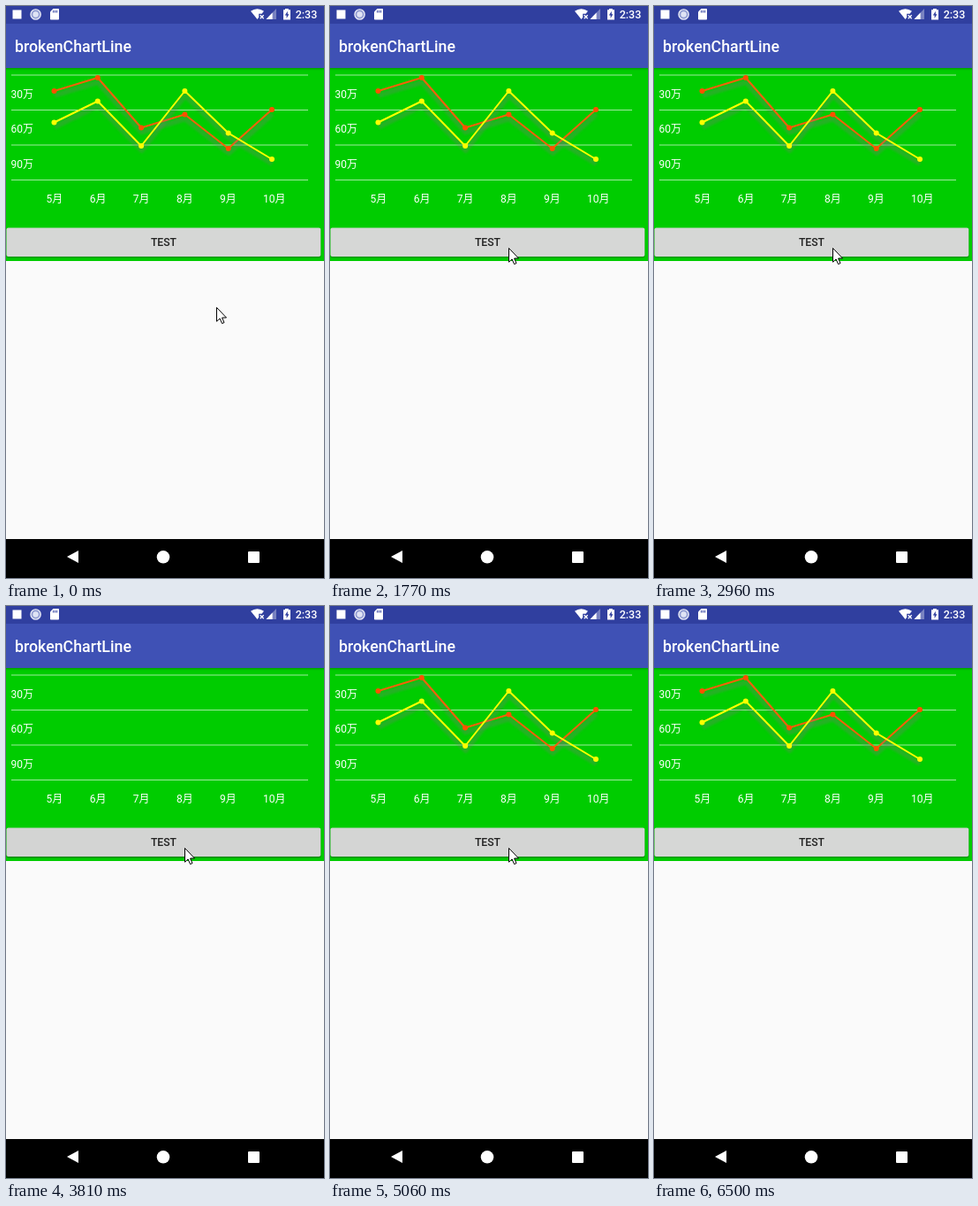
Recreate the animation shown at these times as an HTML page. Size 360x646 px, loop 6930 ms.

```html
<!DOCTYPE html>
<html lang="en">
<head>
<meta charset="utf-8">
<title>brokenChartLine</title>
<style>
  html, body { margin: 0; width: 100%; height: 100%; overflow: hidden; background: #fafafa; }
  svg { display: block; width: 360px; height: 646px; }
  text { font-family: Roboto, "Noto Sans CJK SC", "Noto Sans CJK", sans-serif; fill: #fff; }
  .medium { font-weight: 500; }
  .label { font-size: 12px; }
</style>
</head>
<body>
<svg viewBox="0 0 360 646" xmlns="http://www.w3.org/2000/svg">
  <defs>
    <filter id="soft" x="-10%" y="-20%" width="120%" height="140%"><feGaussianBlur stdDeviation="0.8"/></filter>
    <linearGradient id="fall" x2="0" y2="1">
      <stop stop-opacity=".22"/><stop offset="1" stop-opacity="0"/>
    </linearGradient>
  </defs>

  <rect width="360" height="646" fill="#fafafa"/>
  <rect width="360" height="20" fill="#303f9f"/>
  <rect y="20" width="360" height="50" fill="#3f51b5"/>
  <rect y="70" width="360" height="218" fill="#00cc00"/>
  <rect y="70" width="360" height="3" fill="url(#fall)"/>
  <rect y="602" width="360" height="44"/>

  <!-- status bar -->
  <g fill="#fff">
    <rect x="7.5" y="4.5" width="10" height="10"/>
    <circle cx="33.6" cy="9.5" r="5.6" fill="#8f9ad0" stroke="#e8eaf6" stroke-width="1.4"/>
    <circle cx="33.6" cy="9.5" r="3.2" fill="#dfe3f4"/>
    <path d="M53.5 3H59.2Q60 3 60 3.8V14.7Q60 15.5 59.2 15.5H50.8Q50 15.5 50 14.7V6.5Z"/>
    <path d="M53.6 5V7.6M55.6 5V7.6M57.6 5V7.6" stroke="#303f9f"/>
    <path d="M277 5.8Q284.5 .6 292 5.8L289.6 8.8H286.2V12.8L284.5 15Z"/>
    <path d="M287.7 10.3L291.7 14.3M291.7 10.3L287.7 14.3" stroke="#fff" stroke-width="1.3"/>
    <path d="M306 3V15H294.5Z" opacity=".35"/>
    <path d="M301.6 7.6V15H294.5Z"/>
    <path d="M316 4.2V3H319.8V4.2H322V15.6H314V4.2Z"/>
    <path d="M318.8 5.8L315.8 10.5H317.6V14L320.4 9.2H318.8Z" fill="#303f9f"/>
  </g>
  <text class="medium" x="327.7" y="14" font-size="12.5">2:33</text>
  <text class="medium" x="10" y="51.6" font-size="17.8">brokenChartLine</text>

  <g id="grid"></g>
  <g id="series"></g>

  <!-- button -->
  <rect id="shade" x=".5" y="251" width="356" height="33.5" rx="2.5" fill="#063c06"/>
  <rect id="face" x=".5" y="250.6" width="355.8" height="32.4" rx="2"/>
  <text class="medium" x="178.5" y="271.3" font-size="12.2" text-anchor="middle" style="fill:#222">TEST</text>

  <!-- navigation bar -->
  <g fill="#fff">
    <path d="M69 622L82 615V629Z"/>
    <circle cx="178" cy="622.3" r="7.3"/>
    <rect x="274" y="616" width="13" height="13" rx="1"/>
  </g>

  <path id="cursor" d="M.5 .5V16.2L4.1 12.9L6.6 18.6L9 17.5L6.6 12H11.5Z" fill="#fff" stroke="#000"/>
</svg>

<script>
const LOOP = 6930;
const TICK = 136.8;             // the screen refreshes in coarse steps
const LEAD = 20;
const POINTS = 6;
const TAPS = [15, 28, 37.3];    // in ticks
const ARRIVE = 13, LEAVE = 41;  // pointer reaches and leaves the button
const $ = id => document.getElementById(id);
const clamp = v => Math.min(1, Math.max(0, v));

function add(parent, tag, attrs, text) {
  const node = document.createElementNS("http://www.w3.org/2000/svg", tag);
  for (const key in attrs) node.setAttribute(key, attrs[key]);
  if (text) node.textContent = text;
  parent.appendChild(node);
  return node;
}

// Grid and axis labels
for (let i = 0; i < 4; i++)
  add($("grid"), "path", { d: `M6 ${78 + 39.5 * i}H342`, stroke: "#fff", "stroke-opacity": 0.62 });
for (let i = 0; i < 3; i++)
  add($("grid"), "text", { class: "label", x: 5.6, y: 103.6 + 39.5 * i }, `${30 * (i + 1)}万`);
for (let i = 0; i < POINTS; i++)
  add($("grid"), "text", { class: "label", x: 45.6 + 49.1 * i, y: 222 }, `${i + 5}月`);

function makeSeries(heights, line, dot) {
  const points = heights.map((y, i) => [54.5 + 49.3 * i, y]);
  const group = add($("series"), "g", { fill: "none", "stroke-linejoin": "round" });
  const shadow = add(group, "path", {
    stroke: "#777", "stroke-opacity": 0.3, "stroke-width": 6,
    transform: "translate(.5 5)", filter: "url(#soft)"
  });
  const path = add(group, "path", { stroke: line, "stroke-width": 2 });
  const dots = points.map(([cx, cy]) => add(group, "circle", { cx, cy, r: 3, fill: dot }));
  return count => {
    const d = count > 1 ? "M" + points.slice(0, count).join("L") : "";
    shadow.setAttribute("d", d);
    path.setAttribute("d", d);
    dots.forEach((node, i) => node.setAttribute("visibility", i < count ? "visible" : "hidden"));
  };
}
const series = [
  makeSeries([96, 81, 137.5, 122.5, 161, 117], "#f5600a", "#ff5000"),
  makeSeries([131.5, 107.5, 158, 96, 143.5, 173], "#ffff00", "#ffff00")
];

// Speeds up towards the button, rests, then speeds off through the bottom edge
function pointerAt(tick) {
  const come = 1 - clamp(tick / ARRIVE);
  const near = 1 - come;
  const go = clamp((tick - LEAVE) / 6);
  return [
    238 - 36 * near ** 2 + 118 * go ** 1.5,
    340 - 67 * near ** 3.2 + 490 * go ** 1.78
  ].map(Math.round);
}

// Points return with a sine ease-out shortly after a tap clears them
function pointsAt(since) {
  if (since < 0) return POINTS;
  const p = clamp((since - 0.7) / 3.8);
  return Math.ceil(POINTS * Math.sin(p * Math.PI / 2));
}

const pressAt = since => Math.sin(clamp((since + 1) / 5) * Math.PI) ** 2;

function draw() {
  const tick = Math.floor((performance.now() % LOOP + LEAD) / TICK);
  const since = tick - (TAPS.findLast(tap => tap - 1 <= tick) ?? Infinity);

  const [x, y] = pointerAt(tick);
  $("cursor").setAttribute("transform", `translate(${x} ${y})`);

  const count = pointsAt(since);
  series.forEach(show => show(count));

  const press = pressAt(since);
  const grey = Math.round(214 - 10 * press);
  $("face").setAttribute("fill", `rgb(${grey} ${grey + 1} ${grey})`);
  $("shade").setAttribute("opacity", 0.35 + 0.3 * press);
  requestAnimationFrame(draw);
}
draw();
</script>
</body>
</html>
```
